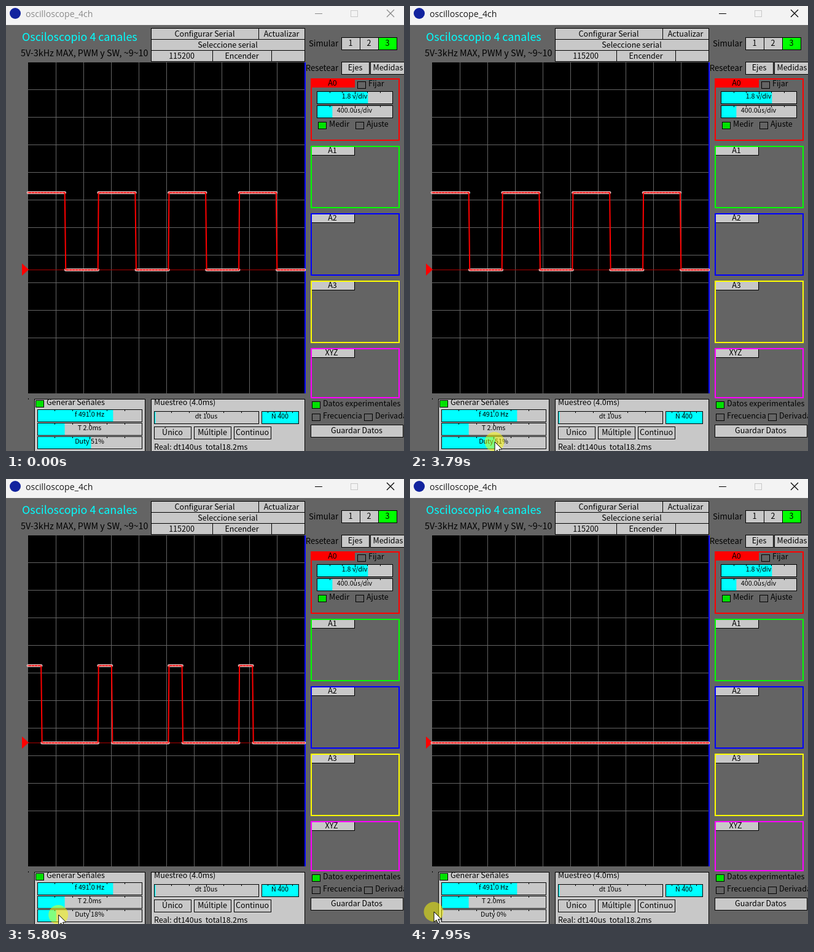
Recreate the animation shown at these times as an HTML page with a canvas. Size 648 px wide and 726 px high, loop 8 s.

```html
<!DOCTYPE html>
<html lang="es">
<head>
<meta charset="utf-8">
<title>oscilloscope_4ch</title>
<style>
html, body { margin: 0; width: 100%; height: 100%; overflow: hidden; background: #646464; }
canvas { display: block; }
</style>
</head>
<body>
<canvas id="stage" width="648" height="726"></canvas>
<script>
const ctx = document.getElementById('stage').getContext('2d');
const LOOP = 8000, STEP = 200 / 3;
const FOCUS_AT = 3520, CURSOR_AT = 2120, SLIDER_LAG = 55;
const GREY = '#646464', LIGHT = '#c8c8c8', CYAN = '#00ffff', GREEN = '#00e100';
const SANS = '"Noto Sans CJK JP", "Noto Sans CJK SC", "Noto Sans CJK", sans-serif';
const BODY = 12.53, SMALL = 10.74;

// Pointer path: time, x, y
const PATH = [
  [2120, 222, 724], [2240, 152, 688], [2380, 118, 671], [2600, 105, 679],
  [2920, 131, 712], [3320, 133, 711], [3520, 138, 711], [3735, 138, 711],
  [4100, 154, 711], [4400, 164.5, 711], [4530, 166, 711], [4620, 160, 711],
  [5210, 86, 711.5], [5400, 73, 711], [5480, 70, 711], [5600, 72, 711],
  [6200, 130, 711], [6290, 142, 711], [6350, 143, 711], [6650, 168, 711],
  [6770, 171.5, 711], [6825, 170, 711], [6880, 161, 711.5], [7100, 113, 711],
  [7400, 69, 709], [7600, 51, 708], [7950, 39, 706], [8000, 39, 706]
];

// Monotone cubic interpolation of one column of PATH
function follow(t, col) {
  const n = PATH.length - 1;
  if (t <= PATH[0][0]) return PATH[0][col];
  if (t >= PATH[n][0]) return PATH[n][col];
  const i = PATH.findIndex(p => p[0] > t) - 1;
  const slope = k => (PATH[k + 1][col] - PATH[k][col]) / (PATH[k + 1][0] - PATH[k][0]);
  const tangent = k => {
    if (k === 0 || k === n) return 0;
    const a = slope(k - 1), b = slope(k);
    return a * b <= 0 ? 0 : 2 * a * b / (a + b);
  };
  const h = PATH[i + 1][0] - PATH[i][0], u = (t - PATH[i][0]) / h, v = 1 - u;
  return PATH[i][col] * (1 + 2 * u) * v * v + h * tangent(i) * u * v * v
    + PATH[i + 1][col] * u * u * (3 - 2 * u) - h * tangent(i + 1) * u * u * v;
}

function fill(x, y, w, h, color) {
  ctx.fillStyle = color;
  ctx.fillRect(x, y, w, h);
}

function box(x, y, w, h, color = LIGHT) {
  fill(x, y, w, h, color);
  ctx.strokeStyle = '#000';
  ctx.lineWidth = 1;
  ctx.strokeRect(x + .5, y + .5, w, h);
}

function text(str, x, y, { size = BODY, color = '#000', align = 'left', font = SANS } = {}) {
  ctx.font = size + 'px ' + font;
  ctx.fillStyle = color;
  ctx.textAlign = align;
  ctx.fillText(str, x, y);
}

function line(points, color, width) {
  ctx.beginPath();
  points.forEach(([x, y]) => ctx.lineTo(x, y));
  ctx.strokeStyle = color;
  ctx.lineWidth = width;
  ctx.stroke();
}

function button(label, x, y, w, h, color) {
  box(x, y, w, h, color);
  text(label, x + w / 2, y + 14, { align: 'center' });
}

function checkbox(label, x, y, on) {
  box(x, y, 13, 11, on ? GREEN : GREY);
  text(label, x + 18, y + 8);
}

function slider(label, x, y, w, value) {
  box(x, y, w, 20);
  fill(x + 1, y + 1, (w - 1) * value, 19, CYAN);
  for (let i = 1; i < 6; i++) fill(Math.round(x + w * i / 6), y, 1, i === 3 ? 5 : 3, '#000');
  text(label, x + w / 2, y + 12, { size: SMALL, align: 'center' });
}

function channel(name, y, h, color, active) {
  if (active) fill(497, y, 71, 15, color);
  else box(497, y, 70, 15);
  ctx.strokeStyle = color;
  ctx.lineWidth = 2;
  ctx.strokeRect(497, y + 1, 143, h - 1);
  text(name, name === 'XYZ' ? 530 : 531.5, y + 12, { align: 'center' });
}

function titleBar(focused) {
  const ink = focused ? '#000' : '#8a8a8a';
  fill(0, 0, 648, 31, '#f3f3f3');
  ctx.fillStyle = '#12239e';
  ctx.beginPath();
  ctx.arc(15, 12, 9, 0, Math.PI * 2);
  ctx.fill();
  text('oscilloscope_4ch', 32, 18, {
    size: 14.1, color: focused ? '#1a1a1a' : ink, font: '"Open Sans", "Noto Sans", sans-serif'
  });
  line([[503, 12.5], [515, 12.5]], ink, 1);
  ctx.strokeStyle = '#c8c8c8';
  ctx.strokeRect(561.5, 7.5, 11, 10);
  line([[620, 6], [632, 18]], ink, 1.2);
  line([[632, 6], [620, 18]], ink, 1.2);
}

function header() {
  text('Osciloscopio 4 canales', 26, 57, { size: 17.9, color: CYAN });
  text('5V-3kHz MAX, PWM y SW, ~9~10', 24, 82, { size: 14.32 });
  button('Configurar Serial', 236, 36, 175, 18);
  button('Actualizar', 411, 36, 75, 18);
  button('Seleccione serial', 236, 54, 250, 18);
  button('115200', 236, 72, 100, 18);
  button('Encender', 336, 72, 96, 18);
  box(432, 72, 54, 18);
}

function sidePanel() {
  text('Simular', 541, 66, { size: 13.2, align: 'right' });
  [1, 2, 3].forEach(n => button(n, 516 + 30 * n, 51, 30, 20, n === 3 ? '#00ff00' : LIGHT));
  text('Resetear', 541, 106, { size: 13.2, align: 'right' });
  button('Ejes', 546, 91, 45, 20);
  button('Medidas', 593, 91, 58, 20);

  channel('A0', 118, 101, '#ff0000', true);
  checkbox('Fijar', 572, 123);
  slider('1.8 v/div', 506, 139, 123, .675);
  slider('400.0us/div', 506, 162, 123, .2);
  checkbox('Medir', 508, 189, true);
  checkbox('Ajuste', 569, 189);
  channel('A1', 228, 101, '#00ff00');
  channel('A2', 338, 101, '#0000ff');
  channel('A3', 448, 101, '#ffff00');
  channel('XYZ', 558, 81, '#ff00ff');

  checkbox('Datos experimentales', 498, 645, true);
  checkbox('Frecuencia', 498, 665);
  checkbox('Derivada', 583, 665);
  button('Guardar Datos', 496, 683, 150, 20);
}

function bottomPanels(duty) {
  fill(36, 640, 1, 2, '#000');
  box(46, 641, 180, 100);
  checkbox('Generar Señales', 48, 643, true);
  slider('f 491.0 Hz', 51, 658, 170, .724);
  slider('T 2.0ms', 51, 680, 170, .258);
  slider('Duty ' + Math.round(duty * 100) + '%', 51, 702, 170, duty);

  box(236, 641, 250, 100);
  text('Muestreo (4.0ms)', 241, 651);
  slider('dt 10us', 241, 661, 170, .008);
  slider('N 400', 416, 661, 60, 1);
  button('Único', 241, 686, 60, 20);
  button('Múltiple', 306, 686, 60, 20);
  button('Continuo', 371, 686, 60, 20);
  text('Real: dt140us  total18.2ms', 241, 724);
}

function plot(duty) {
  const left = 36, right = 486, high = 304.5, low = 430.5, period = 114.7;
  fill(left, 92, 451, 540, '#000');
  for (let i = 1; i <= 10; i++) {
    fill(left + 45 * i, 92, 1, 540, GREY);
    fill(left, 91 + 45 * i, 451, 1, GREY);
  }
  fill(486, 92, 2, 540, '#0000ff');
  fill(left, 430, 451, 1, '#aa0000');
  ctx.fillStyle = '#ff0000';
  ctx.beginPath();
  ctx.moveTo(26, 420);
  ctx.lineTo(37, 430);
  ctx.lineTo(26, 440);
  ctx.fill();

  const wave = [];
  if (duty < .005) wave.push([left, low], [right, low]);
  else for (let k = 0; k < 4; k++) {
    const rise = left + period * k, drop = Math.min(rise + 1 + period * duty, right);
    const end = Math.min(rise + period - 1, right);
    wave.push([rise, high], [drop, high]);
    if (drop + 1 < end) wave.push([drop + 1.5, low], [end, low]);
  }
  const flats = [];
  for (let i = 0; i + 1 < wave.length; i++) {
    if (wave[i][1] === wave[i + 1][1]) flats.push([wave[i], wave[i + 1]]);
  }
  ctx.lineCap = ctx.lineJoin = 'round';
  flats.forEach(f => line(f, '#e6d2d2', 4.6));
  line(wave, '#ff0000', 2);
  // Sample points show through the trace
  ctx.lineCap = 'butt';
  ctx.setLineDash([1, 4]);
  flats.forEach(f => line(f, 'rgba(235,205,205,.6)', 2));
  ctx.setLineDash([]);
  ctx.lineJoin = 'miter';
}

function pointer(x, y, pressed) {
  if (pressed) {
    ctx.fillStyle = 'rgba(255,255,0,.5)';
    ctx.beginPath();
    ctx.arc(x - .5, y, 16, 0, Math.PI * 2);
    ctx.fill();
  }
  const shape = [[0, 0], [0, 17], [4, 13.3], [6.8, 19.5], [9.5, 18.3], [6.8, 12.3], [12, 12]];
  ctx.beginPath();
  shape.forEach(([dx, dy]) => ctx.lineTo(x + dx, y + dy));
  ctx.closePath();
  ctx.fillStyle = '#fff';
  ctx.fill();
  ctx.strokeStyle = '#000';
  ctx.lineWidth = 1;
  ctx.stroke();
}

function draw(time) {
  const t = Math.floor((time + 4) / STEP) * STEP + 12;
  const focused = time >= FOCUS_AT;
  const dragX = focused ? follow(Math.max(t - SLIDER_LAG, 3600), 1) : 138;
  const duty = Math.min(1, Math.max(0, (dragX - 51) / 170));
  fill(0, 0, 648, 726, GREY);
  titleBar(focused);
  header();
  plot(duty);
  sidePanel();
  bottomPanels(duty);
  if (time >= CURSOR_AT) pointer(follow(t, 1), follow(t, 2), focused);
}

function tick() {
  draw(performance.now() % LOOP);
  requestAnimationFrame(tick);
}
tick();
</script>
</body>
</html>
```
